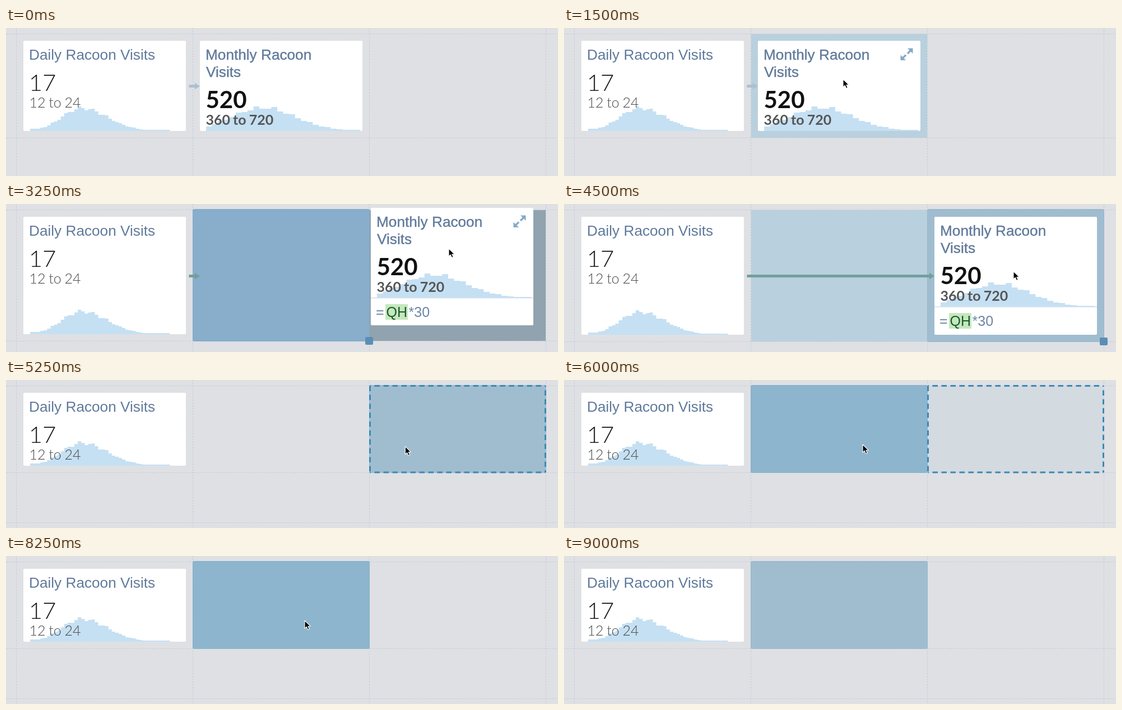
An HTML page that plays this animation: 985x266 px, repeating every 10 s.

```html
<!DOCTYPE html>
<html lang="en">
<head>
<meta charset="utf-8">
<title>Metric cards</title>
<style>
  html, body { margin: 0; width: 100%; height: 100%; overflow: hidden; background: #dfe0e4; }
  svg { display: block; width: 985px; height: 266px; }
  .title { font: 26.2px "Liberation Sans", Arial, sans-serif; fill: #607a9b; }
  .strong { stroke: #607a9b; stroke-width: .4px; }
  .formula { font: 25px "Liberation Sans", Arial, sans-serif; fill: #6d86a6; }
  .code { fill: #1c5a2b; }
  .big { font: 300 42px Lato, sans-serif; fill: #1c1c1c; }
  .range { font: 300 25px Lato, sans-serif; fill: #484848; word-spacing: -1px; }
  .bold { font-weight: 700; }
  .big.bold { fill: #111; }
  .range.bold { fill: #555; }
</style>
</head>
<body>
<svg id="stage" viewBox="0 0 985 266"></svg>
<script>
const stage = document.getElementById('stage');
const LOOP = 10000, TICK = 250;
const CELL = 315, CARD_W = 290;
const colX = i => 18 + i * CELL;

const SELECTED_HOVER = '#88aecb', SELECTED = '#a0bdd0', HOVER = '#b9d0de';
const EMPTY_HOVER = '#8db5ce', DROP = '#91a3ae';

// time, x, y
const CURSOR = [[750, 470, 172], [1500, 498, 92], [2000, 498, 92], [2500, 611, 111],
  [3250, 790, 80], [4000, 801, 101], [4250, 801, 101], [4500, 802, 121],
  [5000, 802, 121], [5750, 533, 116]];
const DRAG = [[2000, 0, 0], [2500, 113, 19], [3250, 305, -16], [3500, 313, -7]];

function along(path, t) {
  const i = path.findIndex(p => p[0] >= t);
  if (i < 1) return path.at(i).slice(1);
  const [t0, x0, y0] = path[i - 1], [t1, x1, y1] = path[i];
  const k = (t - t0) / (t1 - t0);
  return [x0 + (x1 - x0) * k, y0 + (y1 - y0) * k];
}

const rect = (x, y, w, h, fill, more = '') =>
  `<rect x="${x}" y="${y}" width="${w}" height="${h}" fill="${fill}" ${more}/>`;
const text = (x, y, cls, s) => `<text x="${x}" y="${y}" class="${cls}">${s}</text>`;
const group = (x, y, body) => `<g transform="translate(${x} ${y})">${body}</g>`;

// Skewed bell with a regular ripple that crests on the tallest bar.
const daily = { n: 41, w: 6.08, peak: 41, mid: 14.6, left: 5.8, right: 7.6, crest: 14, period: 4 };
const monthly = { n: 26, w: 10.58, peak: 42, mid: 9, left: 5.1, right: 5.6, crest: 8, period: 3 };

function bars(h, x, bottom) {
  let d = `M${x} ${bottom}`;
  for (let i = 0; i < h.n; i++) {
    const z = (i - h.mid) / (i < h.mid ? h.left : h.right);
    const ripple = 1 + .08 * Math.cos((i - h.crest) / h.period * 2 * Math.PI);
    const v = Math.max(h.peak * Math.exp(-z * z / 2) * ripple, 4 * (1 - i / h.n), 1.5);
    d += `V${bottom - Math.round(v)}H${(x + (i + 1) * h.w).toFixed(1)}`;
  }
  return `<path d="${d}V${bottom}Z" fill="#c5e0f3"/>`;
}

function grid(row) {
  let d = '';
  for (let i = 0; i < 4; i++) d += `M${colX(i) + .5} 0V266`;
  for (const y of [10, row, row + 90]) d += `M0 ${y + .5}H985`;
  return `<path d="${d}" stroke="#6e96aa" stroke-opacity=".25" stroke-dasharray="3 2" fill="none"/>`;
}

const tint = (col, row, fill) => rect(colX(col) + 1, 11, 314, row - 11, fill);
const select = (col, row, fill) => rect(colX(col), 9, 316, row - 8, fill, 'rx="3"');
const handle = (col, row) => rect(colX(col + 1) - 7, row - 7, 14, 14, '#5b8eb5', 'rx="2"');

function dashes(col, row) {
  const l = colX(col) + 1.5, r = l + 313, y = 10.5;
  return `<g fill="none" stroke="#3a8ab4" stroke-width="3" stroke-dasharray="9.5 6.5">
    <path d="M${l} ${y}H${r}M${r} ${y}V${row}M${l} ${row}H${r}" stroke-dashoffset="8"/>
    <path d="M${l} ${y}V${row}"/></g>`;
}

function arrow(end, y, fill) {
  return `<path d="M326.5 ${y - 2.5}H${end - 9}V${y - 6}L${end} ${y}L${end - 9} ${y + 6}V${y + 2.5}H326.5Z" fill="${fill}"/>`;
}

function dailyCard(h) {
  return rect(0, 0, CARD_W, h, '#fff', 'rx="2"') + bars(daily, 12, h) +
    text(10, 34, 'title', 'Daily Racoon Visits') +
    text(9.7, 90, 'big', '17') + text(10.5, 120, 'range', '12 to 24');
}

const expandIcon = `<g fill="#86aac6" stroke="#86aac6">
  <path d="M267 13.5H276.5V23ZM254.5 25.5V35H264Z" stroke="none"/>
  <path d="M273 17L267 23M258 31.5L264 25.5" stroke-width="3.4"/></g>`;

function monthlyCard(open, icon, h) {
  let s = rect(0, 0, CARD_W, h, '#fff', 'rx="2"') + bars(monthly, 11, 162);
  if (open) {
    s += rect(0, 161, CARD_W, 1.5, '#cfdfec') + rect(26, 173, 40, 28, '#c5e8be') +
      text(9, 196, 'formula', '=') + text(27.5, 196, 'formula code', 'QH') +
      text(67.5, 196, 'formula', '*30');
  }
  s += text(10, 34, 'title strong', 'Monthly Racoon') + text(11, 65, 'title strong', 'Visits') +
    text(10.5, 121, 'big bold', '520') + text(10.5, 151, 'range bold', '360 to 720');
  return s + (icon ? expandIcon : '');
}

const pointer = `<path d="M0 0V14.2L3.3 11.2L5.6 16.4L8.2 15.3L5.9 10.2H10.2Z"
  fill="#000" stroke="#fff" stroke-width="1.1" stroke-linejoin="round"/>`;

function draw(t) {
  const [cx, cy] = along(CURSOR, t);
  const dragging = t >= 2000 && t < 3750;
  const dropped = t >= 3750 && t < 5000;
  const cut = t >= 5000 && t < 6750;
  const pasted = t >= 6750 && t < 8250;
  const open = dragging || dropped || pasted;
  const hasCard = t < 5000 || pasted;
  const row = dragging ? 246 : open ? 247 : hasCard ? 197 : 166;
  let cells = '', over = '';

  if (t >= 750 && t < 2000) cells = tint(1, row, HOVER);
  if (dragging) {
    if (cx > colX(2)) cells += tint(2, row, DROP);
    cells += select(1, row, SELECTED_HOVER);
    over = handle(1, row);
  }
  if (dropped) {
    cells = tint(1, row, HOVER) + select(2, row, SELECTED);
    over = handle(2, row);
  }
  if (cut) {
    if (t < 6000) {
      cells = select(2, row, SELECTED);
      if (cx < colX(2)) cells += tint(1, row, HOVER);
    } else {
      cells = tint(2, row, '#d3dae0') + select(1, row, EMPTY_HOVER);
    }
    over = dashes(2, row);
  }
  if (pasted) {
    cells = select(1, row, SELECTED_HOVER);
    over = handle(1, row);
  }
  if (t >= 8250) cells = select(1, row, t < 9000 ? EMPTY_HOVER : SELECTED);

  let s = cells + grid(row) + over + group(31, 23, dailyCard(row - 35));
  if (hasCard) {
    const [dx, dy] = dragging ? along(DRAG, t) : [dropped ? CELL : 0, 0];
    const icon = t >= 750 && !dropped;
    s += arrow(dropped ? 661 : 346, open ? 129.5 : 104.5, open ? '#729f9d' : '#acc0d0');
    s += group(346 + dx, 23 + dy, monthlyCard(open, icon, row - 35));
  }
  if (t >= 750 && t < 9000) s += group(cx, cy, pointer);
  stage.innerHTML = s;
}

let last = -1;
const start = performance.now();
function frame() {
  const t = (performance.now() - start) % LOOP;
  const tick = Math.floor(t / TICK);
  if (tick !== last) {
    last = tick;
    draw(tick * TICK);
  }
  requestAnimationFrame(frame);
}
frame();
</script>
</body>
</html>
```
